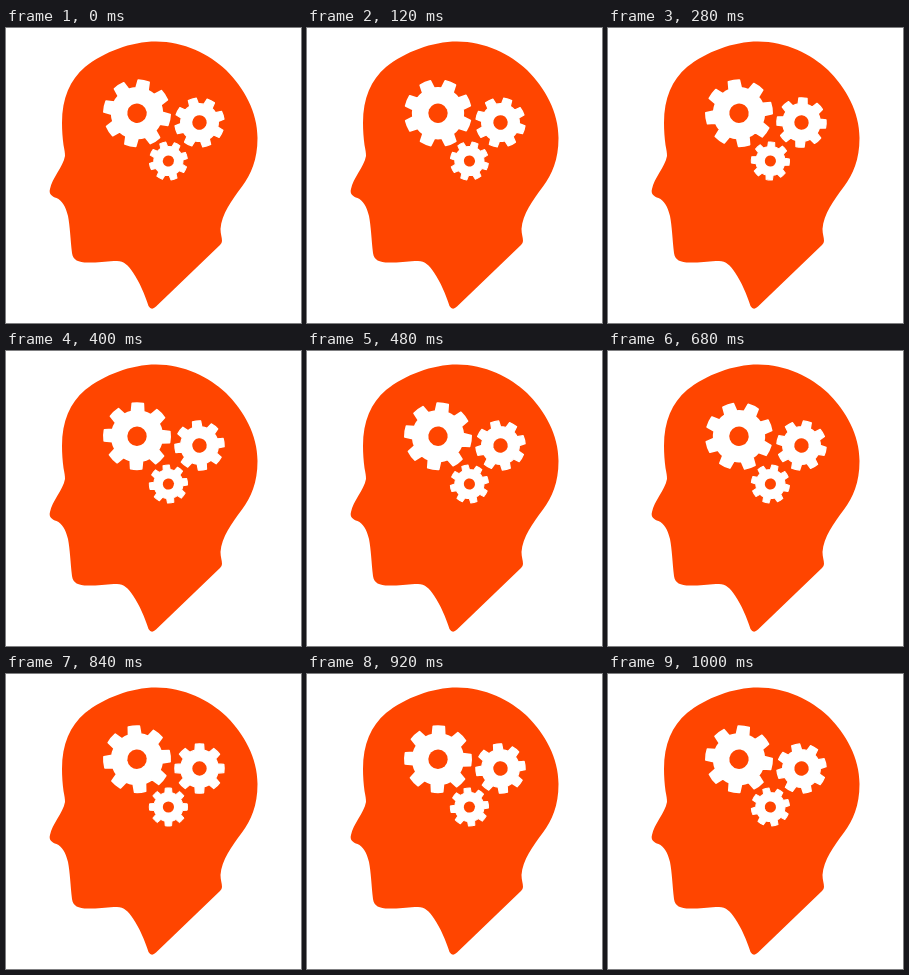
Animation of 295x295 px, one loop 1.04 s. Source, as an HTML page:

```html
<!DOCTYPE html>
<html lang="en">
<head>
<meta charset="utf-8">
<title>Thinking head</title>
<style>
  html, body { margin: 0; width: 100%; height: 100%; overflow: hidden; background: #fff; }
  svg { display: block; width: 100vw; height: 100vh; }
</style>
</head>
<body>
<svg viewBox="0 0 295 295">
  <path fill="#ff4500" d="M150 13.5C178 13.5 203 26 220 42C238 60 251.5 84 251.5 110
    C251.5 132 245 146 236 158.5C226 172 215.5 186 214.5 201C214.500 206 216 209 216 213Q216 215 214 217
    L150 278.500Q145.500 283 142.500 278C139 267 133.500 254 127 244.500
    C122.500 237.500 118 233 111 233C101 233 94 235 82 234.500C72 234.500 67 232 66 225
    C64.500 212 64 198 62 188C59.500 178 56 172.500 50.500 170C46 168.500 42.500 166 44 161
    C46 150 57 139 59 128C59 125 58.500 122 57.500 117C56.500 110 56 102 56 95
    C56 70 64 52 79 39C98 24 125 13.500 150 13.500Z"/>
  <g id="gears" fill="#fff" stroke="#fff" stroke-linejoin="round"></g>
</svg>
<script>
const LOOP = 1040, STEP = 40, TEETH = 8;
const PITCH = 360 / TEETH;
const NS = 'http://www.w3.org/2000/svg';

// start: angle in degrees at the beginning of the loop
const gears = [
  { x: 131, y: 85.2, r: 34, dir: 1, start: 11.8 },
  { x: 193.5, y: 94.5, r: 25.3, dir: -1, start: -17.3 },
  { x: 162.4, y: 133, r: 19.6, dir: -1, start: -17.3 }
];

function polar(radius, degrees) {
  const a = degrees * Math.PI / 180;
  return `${(radius * Math.sin(a)).toFixed(3)} ${(-radius * Math.cos(a)).toFixed(3)}`;
}

// Flat-topped teeth joined by arcs along the root circle.
function gearPath(r) {
  const tip = 0.975 * r, root = 0.745 * r;
  let d = '';
  for (let i = 0; i < TEETH; i++) {
    const a = i * PITCH;
    const base = polar(root, a - 14);
    d += i ? `A${root} ${root} 0 0 1 ${base}` : `M${base}`;
    d += `L${polar(tip, a - 9.6)}A${tip} ${tip} 0 0 1 ${polar(tip, a + 9.6)}L${polar(root, a + 14)}`;
  }
  return d + `A${root} ${root} 0 0 1 ${polar(root, -14)}Z`;
}

function add(parent, tag, attrs) {
  const el = document.createElementNS(NS, tag);
  for (const key in attrs) el.setAttribute(key, attrs[key]);
  return parent.appendChild(el);
}

for (const gear of gears) {
  gear.el = add(document.getElementById('gears'), 'g', {});
  add(gear.el, 'path', { d: gearPath(gear.r), 'stroke-width': gear.r * 0.05 });
  add(gear.el, 'circle', { r: gear.r * 0.285, fill: '#ff4500', stroke: 'none' });
}

function draw(ms) {
  const t = Math.floor((ms % LOOP) / STEP) * STEP;
  const turn = 2 * PITCH * t / LOOP;
  for (const { el, x, y, dir, start } of gears) {
    el.setAttribute('transform', `translate(${x} ${y}) rotate(${start + dir * turn})`);
  }
}

const begin = performance.now();
function tick() {
  draw(performance.now() - begin);
  requestAnimationFrame(tick);
}
tick();
</script>
</body>
</html>
```
